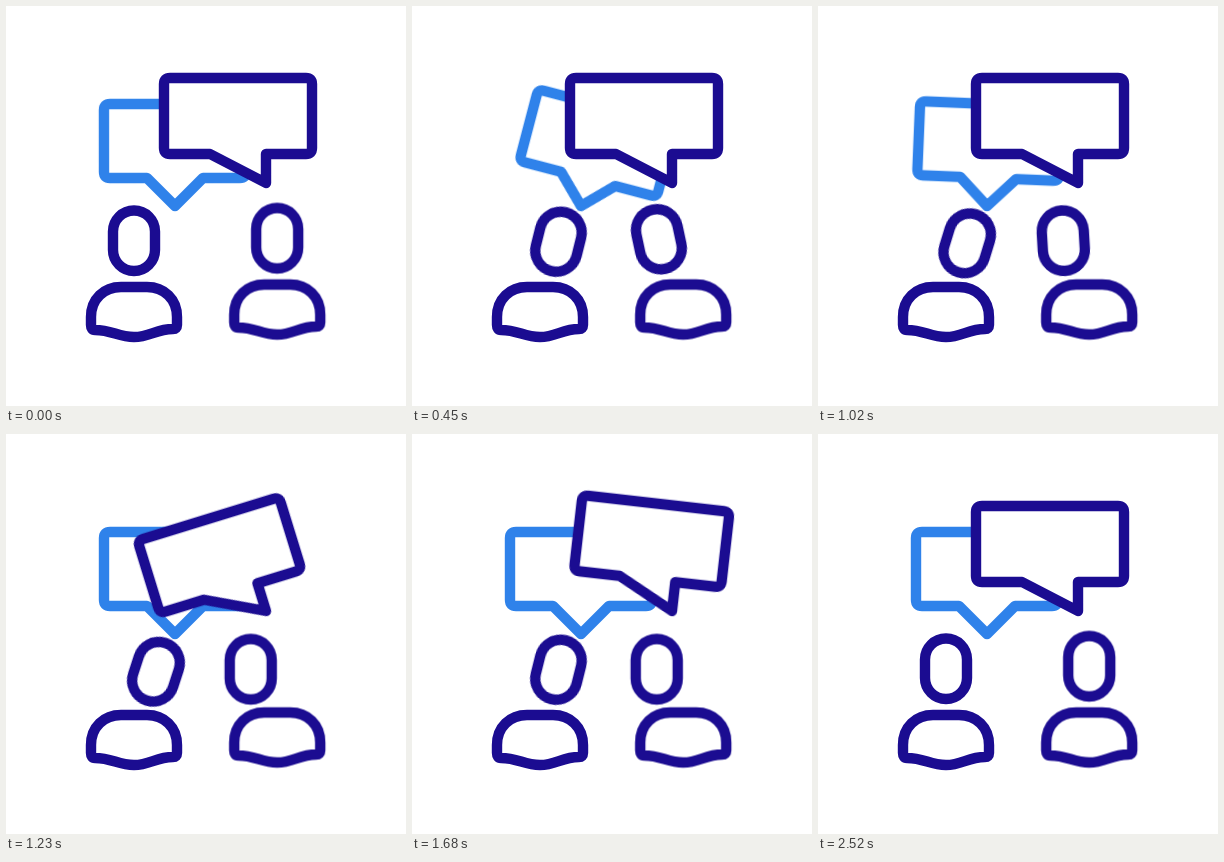
These frames come from a looping animation (400x400 px, 3050 ms). An HTML page:

```html
<!DOCTYPE html>
<html lang="en">
<head>
<meta charset="utf-8">
<title>Conversation</title>
<style>
  html, body { margin: 0; width: 100%; height: 100%; overflow: hidden; background: #fff; }
  svg { display: block; width: 100vw; height: 100vh; }
  svg * { animation-duration: 3050ms; animation-iteration-count: infinite; }

  .line { fill: #fff; stroke: #1b0c91; stroke-width: 10.4; stroke-linejoin: round; }
  .reply { stroke: #2f82ea; transform-origin: 169px 200px; animation-name: reply; animation-timing-function: ease; }
  .speech { transform-origin: 260px 177px; animation-name: speech; animation-timing-function: ease; }
  .person { transform-origin: 128px 331px; animation-timing-function: ease-in-out; }
  .head { transform-origin: 128px 234.7px; animation-timing-function: ease-in-out; }
  .left { animation-name: squash-left; }
  .left .head { animation-name: lean-left; }
  .right { animation-name: squash-right; }
  .right .head { animation-name: lean-right; }

  /* Both bubbles swing on their tips and settle */
  @keyframes reply {
    0% { transform: rotate(0deg); }
    7.87% { transform: rotate(-20deg); }
    15.74% { transform: rotate(15deg); }
    23.61% { transform: rotate(-9.5deg); }
    31.48% { transform: rotate(4deg); }
    39.34%, 100% { transform: rotate(0deg); }
  }
  @keyframes speech {
    0%, 35.41% { transform: rotate(0deg); }
    44.26% { transform: rotate(-20deg); }
    53.11% { transform: rotate(15deg); }
    61.97% { transform: rotate(-9deg); }
    70.82% { transform: rotate(4deg); }
    79.67%, 100% { transform: rotate(0deg); }
  }

  @keyframes squash-left {
    0%, 13.8%, 66.4%, 81.5%, 100% { transform: scale(1, 1); }
    6.6%, 71.5% { transform: scale(1.04, .955); }
  }
  @keyframes squash-right {
    0%, 13.8%, 60.5%, 71%, 100% { transform: scale(1, 1); }
    6.6%, 65.6% { transform: scale(1.04, .96); }
  }

  @keyframes lean-left {
    0% { transform: translate(0, 0) rotate(0deg); }
    13.8%, 15% { transform: translate(18.5px, 1px) rotate(14deg); }
    24.6% { transform: translate(20px, 2px) rotate(15.5deg); }
    40.3% { transform: translate(22px, 3px) rotate(18deg); }
    46.6% { transform: translate(23.5px, 4px) rotate(20deg); }
    54%, 66.9% { transform: translate(18.5px, 1px) rotate(14deg); }
    82.3%, 100% { transform: translate(0, 0) rotate(0deg); }
  }
  @keyframes lean-right {
    0% { transform: translate(0, 0) rotate(0deg); }
    13.8%, 26.2% { transform: translate(-24.3px, 1px) rotate(-12deg); }
    37.7%, 60% { transform: translate(-26.5px, 3px) rotate(0deg); }
    69.2%, 100% { transform: translate(0, 0) rotate(0deg); }
  }
</style>
</head>
<body>
<svg viewBox="0 0 400 400">
  <defs>
    <path id="body" d="M85 319V311C85 293 98 281 115 281H141C158 281 171 293 171 311V319Q171 323 167 323C150 323 144 331 128 331S106 324 89 324Q85 324 85 319Z"/>
    <rect id="head" x="107" y="204.5" width="42" height="60.5" rx="21"/>
  </defs>
  <path class="line reply" d="M104 98H234Q240 98 240 104V166Q240 172 234 172H197L169 200L141 172H104Q98 172 98 166V104Q98 98 104 98Z"/>
  <path class="line speech" d="M164 72H300Q306 72 306 78V142Q306 148 300 148H260V177L204 148H164Q158 148 158 142V78Q158 72 164 72Z"/>
  <g class="person left">
    <use class="line" href="#body"/>
    <use class="line head" href="#head"/>
  </g>
  <g transform="translate(143.2 -2.5)">
    <g class="person right">
      <use class="line" href="#body"/>
      <use class="line head" href="#head"/>
    </g>
  </g>
</svg>
</body>
</html>
```
